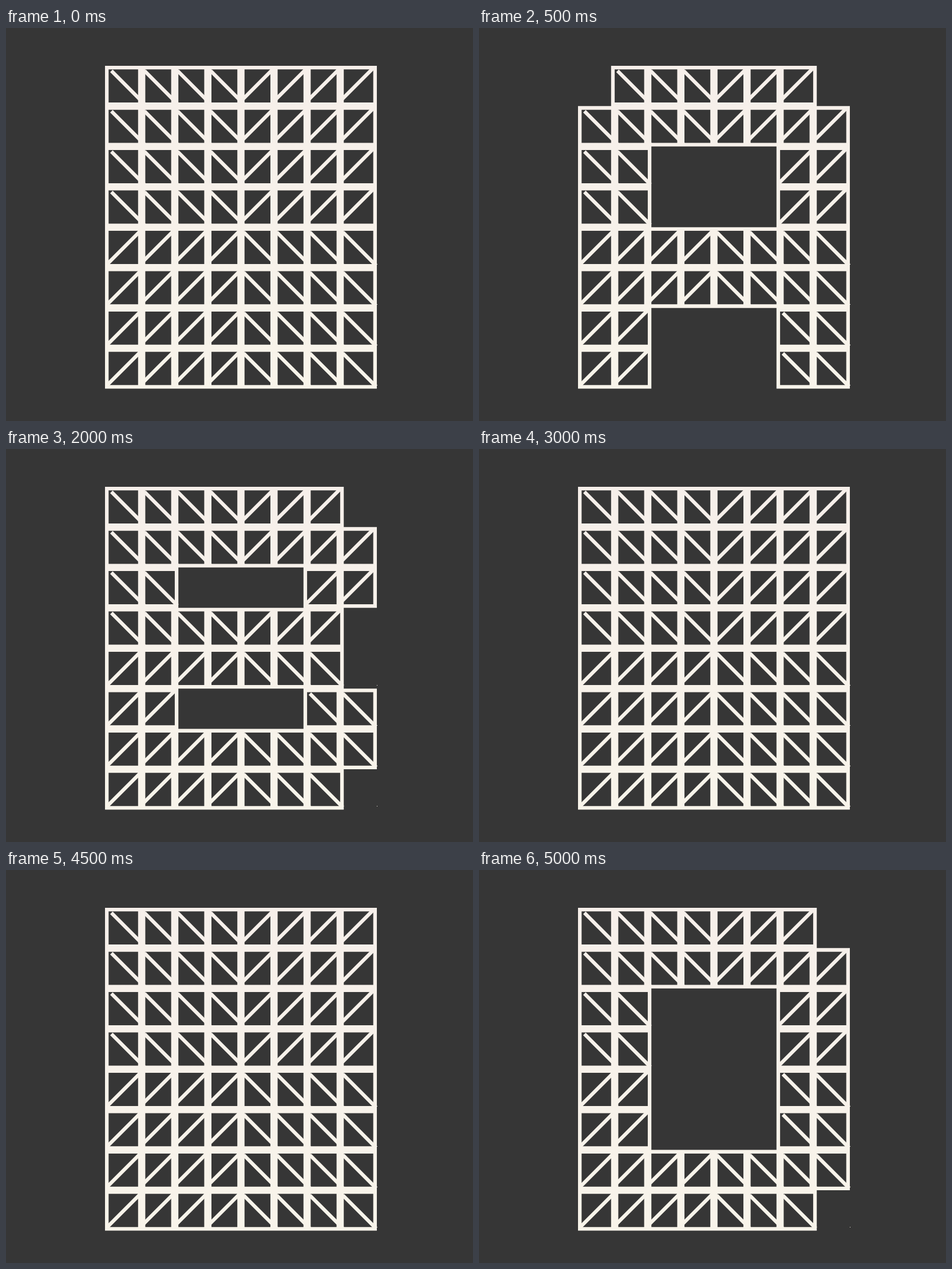
An HTML page with a canvas that plays this animation: 816x686 px, repeating every 6000 ms.

```html
<!DOCTYPE html>
<html lang="en">
<head>
<meta charset="utf-8">
<title>Truss alphabet</title>
<style>
html, body { margin: 0; width: 100%; height: 100%; overflow: hidden; background: #363636; }
canvas { display: block; }
</style>
</head>
<body>
<canvas id="stage" width="816" height="686"></canvas>
<script>
const ctx = document.getElementById('stage').getContext('2d');
const LOOP = 6000, SLOT = 1500, HOLD = 500;
const X0 = 173, Y0 = 65.9, STEP_X = 57.8, STEP_Y = 70.45;
const SIZE = 70.4, LINE = 6.3;

// Row kinds used to assemble the letters
const ALL = '########', LEGS = '##....##', ROUND = '.######.', BOWL = '#######.', STEM = '##......';
const FULL = Array(8).fill(ALL);
const LETTERS = [
  [ROUND, ALL, LEGS, LEGS, ALL, ALL, LEGS, LEGS],
  [BOWL, ALL, LEGS, BOWL, BOWL, LEGS, ALL, BOWL],
  [ROUND, ALL, LEGS, STEM, STEM, LEGS, ALL, ROUND],
  [BOWL, ALL, LEGS, LEGS, LEGS, LEGS, ALL, BOWL]
];

const ink = ctx.createLinearGradient(0, 66, 0, 629);
ink.addColorStop(0, '#f6efea');
ink.addColorStop(1, '#f8f4ea');

function frameCell(x, y) {
  const h = SIZE + 0.1;
  ctx.rect(x, y, SIZE, LINE);
  ctx.rect(x, y + h - LINE, SIZE, LINE);
  ctx.rect(x, y, LINE, h);
  ctx.rect(x + SIZE - LINE, y, LINE, h);
}

function brace(x, y, falling) {
  if (falling) {
    ctx.moveTo(x + 11.2, y + 8.9);
    ctx.lineTo(x + 68.8, y + 66.5);
  } else {
    ctx.moveTo(x + 3, y + 65.2);
    ctx.lineTo(x + 64, y + 4.2);
  }
}

function eachCell(rows, draw) {
  rows.forEach((row, r) => {
    for (let c = 0; c < 8; c++) {
      if (row[c] === '#') draw(X0 + c * STEP_X, Y0 + r * STEP_Y, (r < 4) === (c < 4));
    }
  });
}

function paint(rows) {
  ctx.fillStyle = '#363636';
  ctx.fillRect(0, 0, 816, 686);
  ctx.fillStyle = ctx.strokeStyle = ink;
  ctx.lineWidth = LINE;
  ctx.beginPath();
  eachCell(rows, frameCell);
  ctx.fill();
  ctx.beginPath();
  eachCell(rows, brace);
  ctx.stroke();
  // Brace tips on the right edge stay visible
  for (let r = 4; r < 8; r++) ctx.fillRect(648, Math.round(Y0 + r * STEP_Y + 64), 1, 1);
}

let shown = null;
const start = performance.now();
function tick(now) {
  const t = Math.max(0, now - start) % LOOP;
  const rows = t % SLOT < HOLD ? FULL : LETTERS[Math.floor(t / SLOT)];
  if (rows !== shown) paint(shown = rows);
  requestAnimationFrame(tick);
}
tick(start);
</script>
</body>
</html>
```
